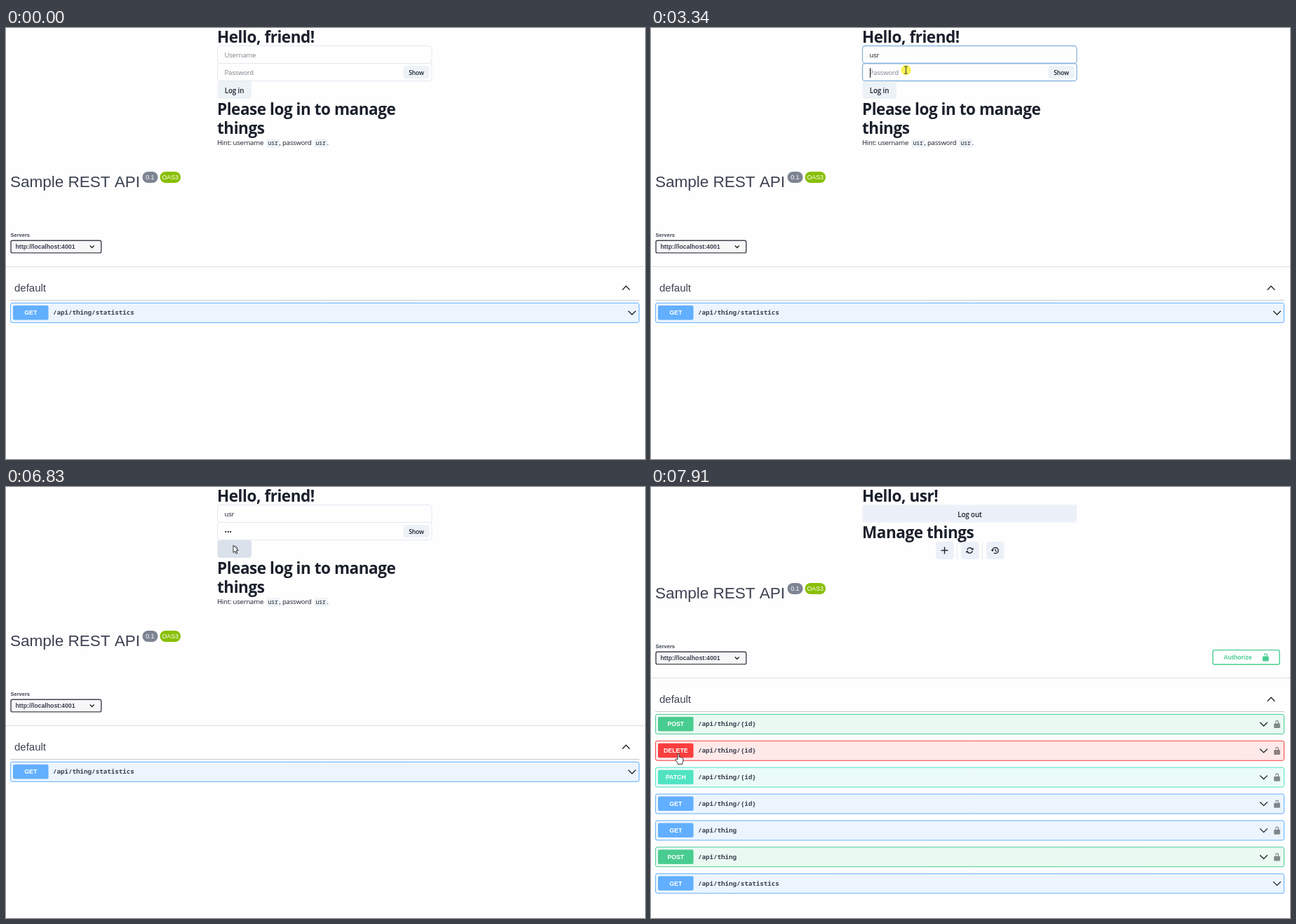
Write an HTML page with a canvas that moves like this. It is 911x615 px and loops after 8000 ms.

```html
<!DOCTYPE html>
<html lang="en">
<head>
<meta charset="utf-8">
<title>Login and API page</title>
<style>
  html, body { margin: 0; width: 100%; height: 100%; overflow: hidden; background: #fefefe; }
  canvas { display: block; width: 911px; height: 615px; }
</style>
</head>
<body>
<canvas id="stage" width="911" height="615"></canvas>
<script>
const ctx = document.getElementById('stage').getContext('2d');
const LOOP = 8000;
const USER = 'usr';

const INK = '#1a202c', SLATE = '#3b4151', LINE = '#e2e8f0';
const BUTTON = '#edf2f7', HOVER = '#dfe5ee', GREEN = '#49cc90';
const METHODS = { GET: '#61affe', POST: GREEN, DELETE: '#f93e3e', PATCH: '#50e3c2' };

// [font, letter spacing]
const HEAD = ['700 22.5px "Open Sans", sans-serif', '-0.45px'];
const BODY = ['9.6px "Open Sans", sans-serif', '-0.22px'];
const LABEL = ['600 9.8px "Open Sans", sans-serif', '-0.1px'];
const SMALL = ['600 8.6px "Open Sans", sans-serif', '-0.15px'];
const CODE = ['8px "Noto Sans Mono", monospace', '0px'];
const PATH = ['700 9.2px "Noto Sans Mono", monospace', '0px'];
const sans = (size, weight = 400) => [`${weight} ${size}px "Liberation Sans", Arial, sans-serif`, '0px'];

const PUBLIC_API = [['GET', '/api/thing/statistics']];
const FULL_API = [
  ['POST', '/api/thing/{id}', true],
  ['DELETE', '/api/thing/{id}', true],
  ['PATCH', '/api/thing/{id}', true],
  ['GET', '/api/thing/{id}', true],
  ['GET', '/api/thing', true],
  ['POST', '/api/thing', true],
  ...PUBLIC_API
];

// Moments in ms
const T = {
  enter: 170, focusUser: 1240, focusPass: 3340, show: 4720, reveal: 4800,
  hide: 5420, mask: 5500, login: 6760, wait: 6830, page: 6920, loaded: 7000
};
const USER_KEYS = [1720, 1870, 1950];
const PASS_KEYS = [3580, 3660, 3800];
const CLICKS = [
  [T.focusUser, 1330], [T.focusPass, 3420], [T.show, T.reveal],
  [T.hide, T.mask], [T.login, T.wait]
];
const TRACK = [
  [170, 828, 559], [870, 441, 43], [1010, 440, 43.5],
  [1950, 440, 43.5], [2030, 440, 49.5], [2180, 440, 49.5], [2490, 363.5, 60],
  [3800, 363.5, 60], [3960, 366, 81], [4110, 366, 81], [4660, 585, 58],
  [4880, 585, 58], [4960, 584.5, 57.5], [5500, 584.5, 57.5], [6210, 324, 83],
  [7230, 324, 83], [7910, 39, 380]
];

const clamp = v => Math.max(0, Math.min(1, v));
const inside = (p, x, y, w, h) => p.x >= x && p.x <= x + w && p.y >= y && p.y <= y + h;
const typed = (keys, t) => keys.filter(k => t >= k).length;
const fade = (t, start) => t < start ? 0 : clamp(0.5 + (t - start) / 160);

function mix(a, b, p) {
  return `rgb(${a.map((v, i) => Math.round(v + (b[i] - v) * p)).join()})`;
}

function pointerAt(t) {
  const i = TRACK.findIndex(k => k[0] > t);
  if (i < 0) return { x: 39, y: 380 };
  const [t0, x0, y0] = TRACK[i - 1], [t1, x1, y1] = TRACK[i];
  const u = (t - t0) / (t1 - t0), e = u * u * (3 - 2 * u);
  return { x: x0 + (x1 - x0) * e, y: y0 + (y1 - y0) * e };
}

function text(s, x, y, [font, spacing], color = INK, align = 'left') {
  ctx.font = font;
  ctx.letterSpacing = spacing;
  ctx.fillStyle = color;
  ctx.textAlign = align;
  ctx.fillText(s, x, y);
  return ctx.measureText(s).width;
}

function box(x, y, w, h, r, fill, stroke, width = 1) {
  ctx.beginPath();
  ctx.roundRect(x, y, w, h, r);
  if (fill) { ctx.fillStyle = fill; ctx.fill(); }
  if (stroke) { ctx.strokeStyle = stroke; ctx.lineWidth = width; ctx.stroke(); }
}

function rule(x, y, w, h, color) {
  ctx.fillStyle = color;
  ctx.fillRect(x, y, w, h);
}

function line(points, color, width) {
  ctx.beginPath();
  points.forEach(([x, y]) => ctx.lineTo(x, y));
  ctx.strokeStyle = color;
  ctx.lineWidth = width;
  ctx.stroke();
}

function arc(x, y, r, from, to, color = INK, width = 1.3) {
  ctx.beginPath();
  ctx.arc(x, y, r, from * Math.PI / 180, to * Math.PI / 180);
  ctx.strokeStyle = color;
  ctx.lineWidth = width;
  ctx.stroke();
}

function shape(points, fill, stroke) {
  ctx.beginPath();
  points.forEach(([x, y]) => ctx.lineTo(x, y));
  ctx.closePath();
  ctx.fillStyle = fill;
  ctx.fill();
  if (stroke) { ctx.strokeStyle = stroke; ctx.lineWidth = 0.9; ctx.stroke(); }
}

function chevron(x, y, w, h, color = '#222', width = 1.3) {
  line([[x - w, y - h], [x, y + h], [x + w, y - h]], color, width);
}

function openLock(x, y, color) {
  ctx.save();
  ctx.translate(x - 6.25, y - 6.25);
  ctx.scale(0.625, 0.625);
  box(3, 8, 14, 11, 1.6, color);
  ctx.strokeStyle = color;
  ctx.lineWidth = 2;
  ctx.stroke(new Path2D('M13 8V5.2C13 3 12 2 10 2S7 3 7 5.2V6'));
  ctx.restore();
}

function field(y, focus) {
  const color = mix([226, 232, 240], [49, 130, 206], focus);
  box(301.5, y, 305.5, 25, 3.75, null, color, 1 + focus * 0.6);
}

function caret(t, since, x, y) {
  if ((t - since) % 1060 < 530) rule(Math.round(x), y, 1, 14, '#111');
}

function codeTag(x) {
  box(x - 2, 158.5, 19, 12, 1.2, BUTTON);
  text(USER, x, 167, CODE);
}

function loginForm(t, p) {
  text('Hello, friend!', 301, 21, HEAD);

  const passFocus = t < T.show ? fade(t, T.focusPass) : 1 - fade(t, T.show);
  const userFocus = fade(t, T.focusUser) * (1 - fade(t, T.focusPass));
  const fields = [[25.5, userFocus], [50.5, passFocus]];
  fields.sort((a, b) => a[1] - b[1]).forEach(f => field(...f));

  const n = typed(USER_KEYS, t), m = typed(PASS_KEYS, t);
  const shown = t >= T.reveal && t < T.mask;
  const hint = '#7c838c';
  const userW = n ? text(USER.slice(0, n), 311.5, 42, BODY)
    : (text('Username', 311.5, 42, BODY, hint), 0);
  const secret = shown ? USER : '•'.repeat(m);
  const passW = m ? text(secret, 311.5, 67, BODY)
    : (text('Password', 311.5, 67, BODY, hint), 0);

  if (t >= T.focusUser && t < T.focusPass) {
    caret(t, n ? USER_KEYS[n - 1] : T.focusUser, 312 + userW, 31);
  } else if (t >= T.focusPass && t < T.show) {
    caret(t, m ? PASS_KEYS[m - 1] : T.focusPass, 312 + passW, 57);
  }

  const half = shown ? 17 : 18.5;
  const overShow = t >= T.enter && inside(p, 566, 54, 38, 18);
  box(585 - half, 54, half * 2, 18, 3.5, overShow ? HOVER : BUTTON);
  text(shown ? 'Hide' : 'Show', 585, 66.5, SMALL, INK, 'center');

  const overLogin = t >= T.enter && inside(p, 302, 76, 48, 25);
  box(301.5, 76, 48.5, 25, 3.75, t >= T.login ? '#dae1eb' : overLogin ? '#e2e8f0' : BUTTON);
  if (t < T.wait) text('Log in', 325.5, 93, LABEL, INK, 'center');
  else arc(325.5, 88.5, 4.5, -80, 80, '#555c68', 1);

  text('Please log in to manage', 301, 124, HEAD);
  text('things', 301, 151, HEAD);
  text('Hint: username', 301, 167, BODY);
  codeTag(373.5);
  text(', password', 389.5, 167, BODY);
  codeTag(441.5);
  text('.', 457.5, 167, BODY);
}

function iconButtons() {
  const fill = '#ecf0f8';
  [406, 442, 478].forEach(x => box(x, 78, 25.5, 25, 3.75, fill));
  [436, 472].forEach(x => rule(x, 78, 1, 25, LINE));

  line([[413.5, 90.5], [423.5, 90.5]], INK, 1.4);
  line([[418.5, 85.5], [418.5, 95.5]], INK, 1.4);

  arc(454.5, 90.5, 3.8, 190, 335);
  arc(454.5, 90.5, 3.8, 10, 155);
  shape([[456.5, 89.8], [459.8, 89.8], [459.3, 86.6]], INK);
  shape([[452.5, 91.2], [449.2, 91.2], [449.7, 94.4]], INK);

  arc(491, 90.5, 4.2, -175, 125);
  shape([[484.7, 89.5], [489, 89.5], [486.8, 92.2]], INK);
  line([[491, 88], [491, 91], [493, 92.2]], INK, 1.1);
}

function account(t) {
  text(`Hello, ${USER}!`, 301, 21, HEAD);
  box(301.5, 25.5, 305.5, 25, 2.5, '#ecf0f8');
  text('Log out', 454.5, 42.5, LABEL, INK, 'center');
  text('Manage things', 301, 73, HEAD);
  iconButtons();
  if (t < T.loaded) arc(308.5, 110.8, 7.2, -82, 100, INK, 1.3);
}

function endpoint([method, path, locked], y) {
  const color = METHODS[method];
  box(6.5, y, 896, 28, 2.5, color + '1c', color);
  box(10, y + 3.5, 50.5, 20.5, 2, color);
  text(method, 35.3, y + 16.8, sans(8.75, 700), '#fff', 'center');
  text(path, 67, y + 17, PATH, SLATE);
  chevron(locked ? 873.5 : 892.5, y + 14, 5.3, 2.6);
  if (locked) openLock(892.5, y + 14, 'rgba(0,0,0,.45)');
}

function apiDocs(dy, rows, authorize) {
  ctx.save();
  ctx.translate(0, dy);
  text('Sample REST API', 6, 227, sans(22.5), SLATE);
  box(194.5, 205, 22, 16, 8, '#7d8492');
  text('0.1', 205.3, 216, sans(8.75), '#fff', 'center');
  box(219.5, 205, 29.5, 16, 8, '#89bf04');
  text('OAS3', 234.2, 216, sans(8.75), '#fff', 'center');

  text('Servers', 6.5, 298, sans(7.5, 700), SLATE);
  box(7, 303.3, 128.7, 17.6, 2.2, '#f7f7f7', '#41444e', 1.4);
  text('http://localhost:4001', 13.5, 315, sans(8.75, 700), SLATE);
  chevron(122.7, 312, 3, 1.5, '#222', 1.3);

  if (authorize) {
    box(801, 300.6, 95, 20.6, 2.2, '#fff', GREEN, 1.4);
    text('Authorize', 816.3, 314, sans(8.75, 700), GREEN);
    openLock(876.3, 310.8, GREEN);
  }

  rule(0, 340, 911, 1, '#dcdee1');
  text('default', 12, 375.5, sans(15), SLATE);
  chevron(884, 371, 5.3, -2.7);
  rule(6, 388, 897, 1, '#c8cace');
  rows.forEach((row, i) => endpoint(row, 392.4 + i * 37.9));
  ctx.restore();
}

function arrow(x, y) {
  shape([[0, 0], [0, 10.5], [2.4, 8.4], [4, 12.2], [5.7, 11.4], [4.1, 7.8], [7.2, 7.6]]
    .map(([a, b]) => [x + a, y + b]), '#fff', '#222');
}

function hand(x, y) {
  ctx.save();
  ctx.translate(x, y);
  ctx.fillStyle = '#fff';
  ctx.strokeStyle = '#222';
  ctx.lineWidth = 0.9;
  const p = new Path2D('M-1 9V1.2Q0 -.4 1.1 1.2V5.5Q2.5 4.6 3.3 6Q4.6 5.3 5.3 6.6' +
    'Q6.6 6.1 6.8 7.6V11Q6.6 13 5.5 14V15.5H-.7V14.2L-4 9.5Q-4.3 7.8 -2.7 8Z');
  ctx.fill(p);
  ctx.stroke(p);
  ctx.restore();
}

function beam(x, y) {
  const c = '#333';
  line([[x, y - 4.5], [x, y + 4.5]], c, 1);
  [-5, 5].forEach(d => line([[x - 2.3, y + d], [x + 2.3, y + d]], c, 1));
}

function pointer(t, p) {
  if (t < T.enter) return;
  if (t >= USER_KEYS[0] && t < USER_KEYS[2]) return;
  if (t >= PASS_KEYS[0] && t < PASS_KEYS[2]) return;

  if (CLICKS.some(([a, b]) => t >= a && t < b)) {
    ctx.beginPath();
    ctx.arc(p.x, p.y, 7.2, 0, Math.PI * 2);
    ctx.fillStyle = 'rgba(250,240,40,.8)';
    ctx.fill();
  }

  const form = t < T.page;
  const onButton = inside(p, 566, 54, 38, 18) || (t < T.wait && inside(p, 302, 76, 48, 25));
  const onDocs = form ? inside(p, 6, 352, 897, 68) : inside(p, 6, 284, 897, 296);
  if (onDocs || (form && onButton)) hand(p.x, p.y);
  else if (form && inside(p, 301, 25, 306, 51)) beam(p.x, p.y);
  else arrow(p.x, p.y);
}

function draw(t) {
  ctx.fillStyle = '#fefefe';
  ctx.fillRect(0, 0, 911, 615);
  const p = t < T.enter ? { x: -50, y: -50 } : pointerAt(t);
  if (t < T.page) {
    loginForm(t, p);
    apiDocs(0, PUBLIC_API, false);
  } else {
    account(t);
    apiDocs(t < T.loaded ? -53 : -68, FULL_API, true);
  }
  pointer(t, p);
}

const start = performance.now();
function tick() {
  draw((performance.now() - start) % LOOP);
  requestAnimationFrame(tick);
}
tick();
</script>
</body>
</html>
```
